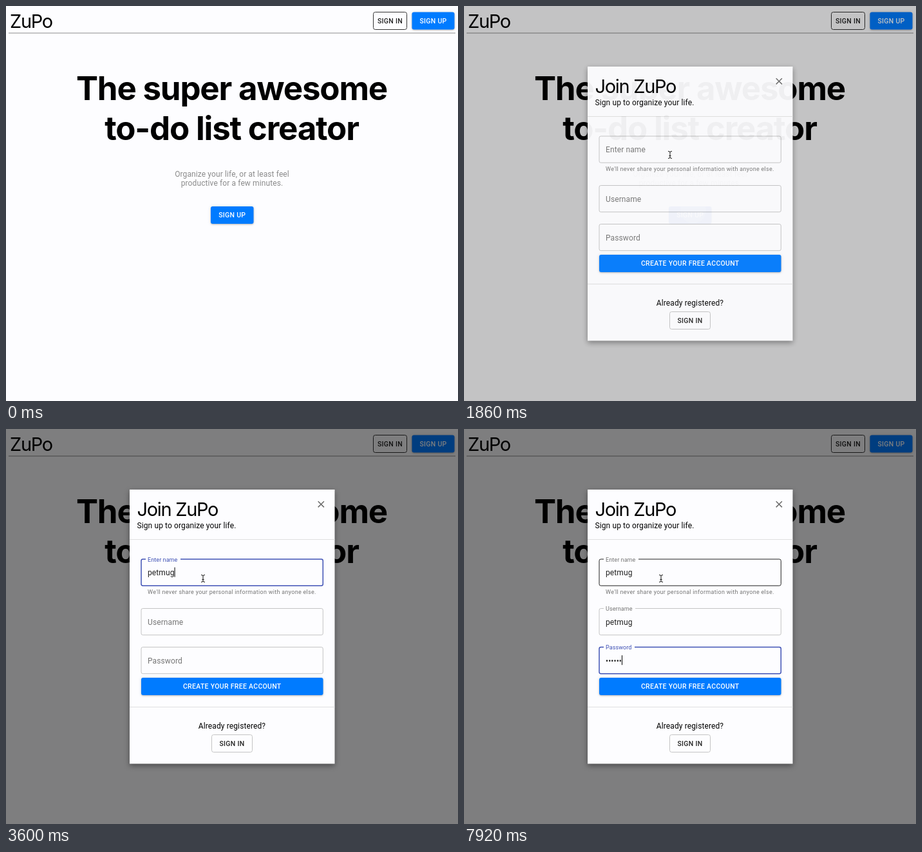
These frames come from a looping animation (702 by 613 pixels, 8 s). An HTML page:

```html
<!DOCTYPE html>
<html lang="en">
<head>
<meta charset="utf-8">
<title>Sign up</title>
<style>
  html, body { margin: 0; width: 100%; height: 100%; overflow: hidden; background: #fdfdff; }
  svg { display: block; width: 702px; height: 613px; }
  text { font: 12px Roboto, sans-serif; letter-spacing: .11px; white-space: pre; }
  .mid { text-anchor: middle; }
  .brand { font: 400 29px Inter, sans-serif; letter-spacing: -1.3px; font-optical-sizing: none; }
  .hero { font: 700 51px Inter, sans-serif; letter-spacing: -1.2px; font-optical-sizing: none; }
  .caps { font: 500 10.5px Roboto, sans-serif; letter-spacing: .3px; }
  .hint { font-size: 9px; letter-spacing: .3px; }
  .lift { filter: drop-shadow(0 1.2px 1.2px rgba(0, 0, 0, .24)) drop-shadow(0 .7px 2.5px rgba(0, 0, 0, .1)); }
</style>
</head>
<body>
<svg id="stage" viewBox="0 0 702 613"></svg>
<script>
const LOOP = 8000;
const BRAND = 'ZuPo', USER = 'petmug';
const BLUE = '#007bff', FOCUS = '#3f51b5', GREY = '#757575', PAPER = '#fdfdff';
const stage = document.getElementById('stage');

const label = (x, y, str, cls = '', fill = '#000') =>
  `<text x="${x}" y="${y}" class="${cls}" fill="${fill}">${str}</text>`;

const button = (x, y, w, str, border, id = '') => {
  const paint = border ? `fill="none" stroke="${border}"` : `fill="${BLUE}" class="lift"`;
  return `<rect id="${id}" x="${x}" y="${y}" width="${w}" height="27" rx="3" ${paint}/>` +
    label(x + w / 2, y + 17.2, str, 'caps mid', border ? '#212121' : '#fff');
};

const rule = (x1, x2, y, color) =>
  `<path d="M${x1} ${y}H${x2}" stroke="${color}" fill="none"/>`;

// Typing times sit next to the moments each field gains and loses focus.
const fields = [
  { name: 'Enter name', y: 202, gap: 54, value: USER, focus: 2330, blur: 4200,
    keys: [2920, 3020, 3210, 3300, 3500, 3600] },
  { name: 'Username', y: 278.5, gap: 49, value: USER, focus: 4200, blur: 6200,
    keys: [4790, 4880, 5080, 5280, 5370, 5570] },
  { name: 'Password', y: 338.5, gap: 48, value: '••••••', focus: 6200, blur: LOOP,
    keys: [7040, 7140, 7340, 7430, 7720, 7920] }
];

const fieldMarkup = f => `<g class="field">
  <rect x="210" y="${f.y}" width="282.3" height="41.2" rx="2.6" fill="none"/>
  <rect x="217" y="${f.y - 2}" height="4" fill="${PAPER}"/>
  <text>${f.name}</text>
  ${label(220, f.y + 25.2, '', '', '#212121')}
  <rect y="${f.y + 12.7}" width="1" height="15"/>
</g>`;

stage.innerHTML = `
  <clipPath id="buttonClip"><rect x="318" y="311" width="66.5" height="27" rx="3"/></clipPath>
  <rect width="702" height="613" fill="${PAPER}"/>
  ${label(6, 34, BRAND, 'brand')}
  ${rule(4, 698, 42, '#8c8c8c')}
  ${button(570.5, 9.5, 52, 'SIGN IN', '#333')}
  ${button(630.5, 9.5, 66, 'SIGN UP')}
  ${label(350.5, 146.3, 'The super awesome', 'hero mid')}
  ${label(350.5, 208.3, 'to-do list creator', 'hero mid')}
  ${label(351, 265.3, 'Organize your life, or at least feel', 'mid', '#8b8b8b')}
  ${label(351, 279, 'productive for a few minutes.', 'mid', '#8b8b8b')}
  ${button(318, 311, 66.5, 'SIGN UP', '', 'cta')}
  <circle id="ripple" cx="356" cy="317" fill="#fff" opacity=".2" clip-path="url(#buttonClip)"/>
  <rect id="backdrop" width="702" height="613"/>
  <g id="dialog">
    <rect x="192" y="94" width="318.5" height="425.5" fill="${PAPER}"
      style="filter: drop-shadow(0 3px 4px rgba(0, 0, 0, .4))"/>
    ${label(203.5, 135, 'Join ' + BRAND, 'brand')}
    ${label(203.5, 154, 'Sign up to organize your life.')}
    <path d="M484.7 112.2l9.2 9.2m0-9.2l-9.2 9.2" stroke="#6b6b6b" stroke-width="1.5"/>
    ${rule(192, 510.5, 171.5, '#e0e0e0')}
    ${fields.map(fieldMarkup).join('')}
    ${label(220, 256.3, "We'll never share your personal information with anyone else.", 'hint', GREY)}
    ${button(210, 386, 282.5, 'CREATE YOUR FREE ACCOUNT')}
    ${rule(192, 510.5, 431.5, '#e0e0e0')}
    ${label(351, 465, 'Already registered?', 'mid')}
    ${button(319.5, 474.5, 63, 'SIGN IN', '#c4c4c4')}
  </g>
  <g id="cursor">
    <path id="arrow" d="M0 0V13L3 10.2 5 15 7 14.1 5 9.6H9Z" stroke="#fff" stroke-width=".9"/>
    <path id="hand" d="M-1.2 0Q0-1.2 1.2 0V5L6 6.2Q7.4 6.7 7 8.5L6 14H-1L-4.6 9.2Q-4.8 7.6-3 8L-1.2 9.3Z"
      fill="#fff" stroke="#000"/>
    <g id="beam" fill="none">
      <path d="M-3-5.5Q0-5.5 0-4 0-5.5 3-5.5M0-4V4M-3 5.5Q0 5.5 0 4 0 5.5 3 5.5" stroke="#fff" stroke-width="2.4"/>
      <path d="M-3-5.5Q0-5.5 0-4 0-5.5 3-5.5M0-4V4M-3 5.5Q0 5.5 0 4 0 5.5 3 5.5M-1.5 1.5H1.5" stroke="#111"/>
    </g>
  </g>`;

const el = id => document.getElementById(id);
const set = (node, attrs) => {
  for (const key in attrs) node.setAttribute(key, attrs[key]);
};
const show = (node, on) => set(node, { visibility: on ? 'visible' : 'hidden' });
const clamp = v => Math.max(0, Math.min(1, v));
const easeOut = p => 1 - (1 - p) ** 3;

// Linear interpolation through rows of [time, ...values].
function track(rows, t) {
  const next = rows.findIndex(row => row[0] > t);
  if (next < 0) return rows[rows.length - 1].slice(1);
  if (next === 0) return rows[0].slice(1);
  const a = rows[next - 1], b = rows[next];
  const p = (t - a[0]) / (b[0] - a[0]);
  return a.slice(1).map((v, i) => v + (b[i + 1] - v) * p);
}

const cursorPath = [
  [420, 229, 203], [890, 384, 385], [1280, 384, 385], [1560, 356, 317], [1670, 356, 317],
  [1770, 348, 299], [1860, 320, 231], [1960, 317.5, 227], [2150, 315, 228], [2300, 306, 232]
];
const backdropFade = [[1670, 0], [1770, .02], [1860, .23], [1960, .4], [2060, .5]];
const dialogFade = [[1670, 0], [1770, .36], [1860, .945], [1960, 1]];

const groups = [...document.querySelectorAll('.field')];

function drawField(f, i, t) {
  const [frame, notch, name, value, caret] = groups[i].children;
  const focused = t >= f.focus && t < f.blur;
  const hovered = i === 0 ? t >= 1900 : i === 1 && t >= 1700 && t < 1820;
  const raised = easeOut(clamp((t - f.focus) / 200));
  set(frame, {
    stroke: focused ? FOCUS : hovered ? '#212121' : '#c4c4c4',
    'stroke-width': focused ? 1.5 : 1
  });
  set(notch, { width: f.gap * raised });
  set(name, {
    transform: `translate(220 ${f.y + 25.2 - 21.7 * raised}) scale(${1 - .25 * raised})`,
    fill: focused ? FOCUS : GREY
  });

  const typed = f.keys.filter(k => k <= t);
  const str = f.value.slice(0, typed.length);
  if (value.textContent !== str) value.textContent = str;
  const lastInput = typed.length ? typed[typed.length - 1] : f.focus;
  show(caret, focused && (t - lastInput) % 980 < 490);
  set(caret, { x: 220 + (str ? value.getComputedTextLength() : 0) });
}

function draw(t) {
  const [x, y] = track(cursorPath, t);
  const onButton = t > 420 && t < 1900 &&
    (t > 1560 || (x > 318 && x < 384.5 && y > 311 && y < 338));
  const beam = t >= 1700;

  set(el('cta'), { fill: onButton ? '#003fc6' : BLUE });
  set(el('ripple'), { r: 20 * clamp((t - 1560) / 200) });
  set(el('backdrop'), { opacity: track(backdropFade, t)[0] });
  const opacity = track(dialogFade, t)[0];
  set(el('dialog'), { opacity, display: opacity ? 'inline' : 'none' });
  fields.forEach((f, i) => drawField(f, i, t));

  set(el('cursor'), {
    transform: `translate(${x} ${y})`,
    display: t < 420 ? 'none' : 'inline'
  });
  show(el('beam'), beam);
  show(el('hand'), onButton && !beam);
  show(el('arrow'), !onButton && !beam);
}

const start = performance.now();
function tick() {
  draw((performance.now() - start) % LOOP);
  requestAnimationFrame(tick);
}
tick();
</script>
</body>
</html>
```
